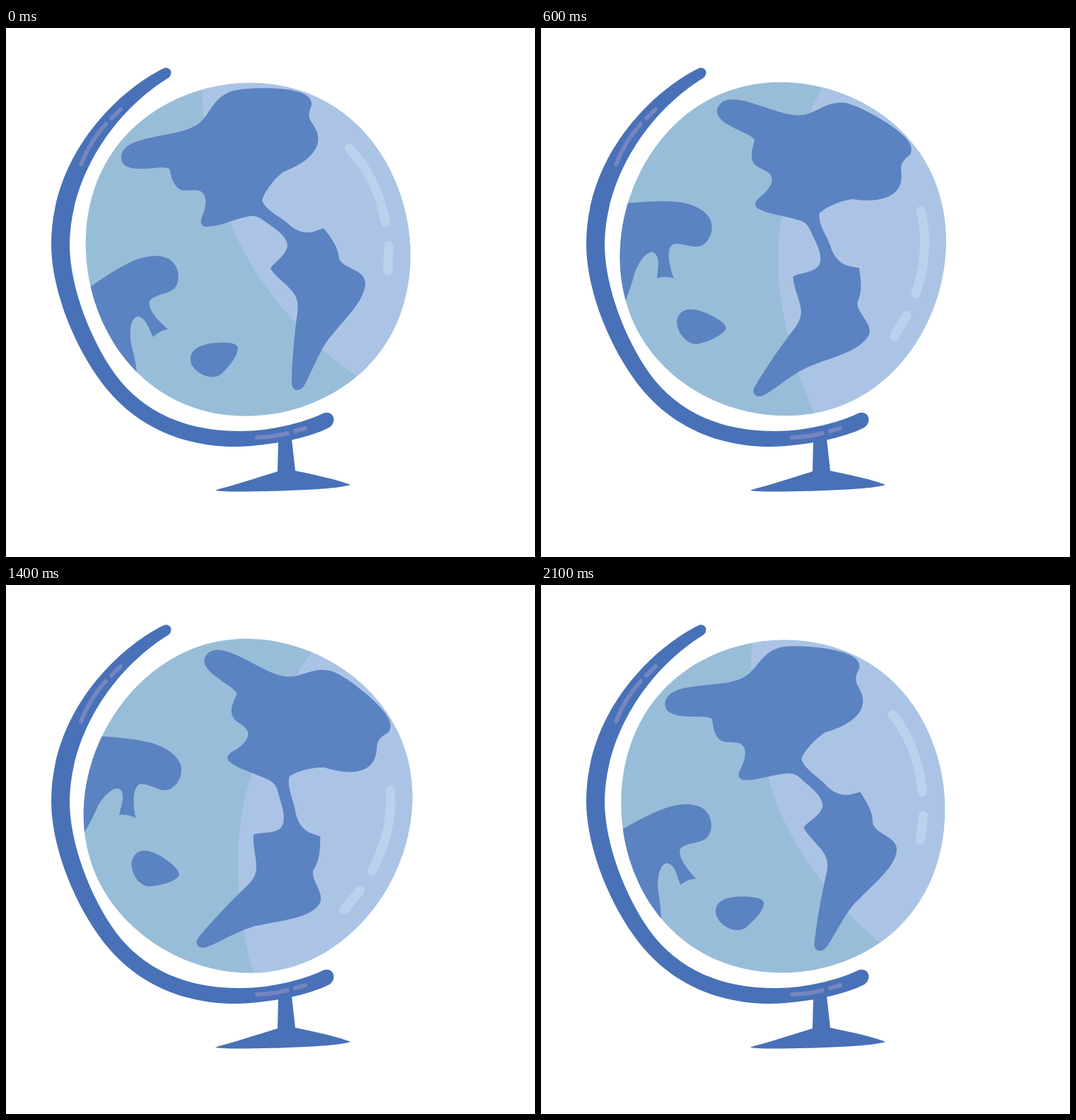
Animation of 748 by 748 pixels, one loop 2200 ms. Source, as an HTML page:

```html
<!DOCTYPE html>
<html lang="en">
<head>
<meta charset="utf-8">
<title>Swinging globe</title>
<style>
  html, body { margin: 0; width: 100%; height: 100%; overflow: hidden; background: #fff; }
  svg { display: block; width: 100vw; height: 100vh; }
  .land { fill: #5b83c1; }
  .stand { fill: #4871b8; }
  .line { fill: none; stroke-linecap: round; }
  .shine { stroke: #bcd1ee; stroke-width: 13; }
  .mark { stroke: #7585c0; stroke-width: 6; }
</style>
</head>
<body>
<svg viewBox="0 0 748 748">
  <defs><clipPath id="ball"><path id="rim"/></clipPath></defs>

  <g id="globe">
    <g clip-path="url(#ball)">
      <rect x="90" y="60" width="510" height="510" fill="#98bdd9"/>
      <path fill="#abc4e6" d="M277 60 L277 84 C281 170 294 222 317 272 C338 329 370 375 411 418
        C440 449 465 472 500 495 L620 560 L620 60 Z"/>
      <path class="land" d="M163 183 C163 168 180 160 205 155 C235 148 262 147 278 130
        C292 114 296 97 320 89 C345 83 393 84 413 90 C427 94 433 101 432 109
        C428 120 427 124 431 132 C438 142 443 150 441 162 C437 182 412 196 393 203
        C380 212 365 232 362 244 C368 258 385 265 398 276 C410 288 425 292 438 287
        C444 285 446 284 449 283 C456 292 470 308 471 326 C477 341 507 341 508 360
        C508 385 480 410 462 433 C445 450 432 488 422 505 C417 514 405 515 404 503
        C404 480 407 440 411 410 C414 393 413 383 406 374 C398 363 380 351 374 340
        C380 330 396 322 398 308 C397 295 384 286 371 277 C360 269 354 263 340 267
        C318 272 300 281 283 281 C275 280 274 274 278 265 C283 252 284 240 279 234
        C272 225 258 232 248 229 C236 224 234 210 231 199 C222 195 210 199 190 199
        C172 199 163 194 163 183 Z"/>
      <path class="land" d="M110 372 C125 362 150 344 172 333 C195 321 218 319 231 327
        C244 336 246 352 242 362 C236 378 212 374 203 386 C200 398 215 414 229 426
        C221 427 214 431 208 437 C202 425 198 409 186 408 C176 410 174 430 177 447
        C181 462 184 475 186 495 L110 495 Z"/>
      <path class="land" d="M261 466 C262 452 280 446 300 445 C316 444 328 446 328 453
        C327 466 312 482 305 489 C296 496 284 494 274 488 C265 482 260 475 261 466 Z"/>
      <path class="line shine" d="M485 170 Q525 212 536.5 275 M541 308 L540 343"/>
    </g>
  </g>

  <path class="stand" d="M222 57.5 C160 88 64 178 64 306 C64 365 92 440 130 494
    C170 552 235 592 325 592 C375 591 430 579 457 565 C465 560 465 550 460 546
    C456 543 451 543 446 546 C420 558 375 570 333 570 C248 571 189 538 153.5 488.5
    C119 440 90 365 90 306 C91 206 157 115 229 71 C234 68 235 61 231 58
    C228 55.5 225 56 222 57.5 Z"/>
  <path class="stand" d="M385 583 L404 581 L409 626 C438 632 474 640 487 646
    C470 652 400 655 330 655.5 C312 655.5 298 655 296 653.5 C320 647 355 636 384 627 Z"/>
  <path class="line mark" d="M106 193 Q118 161 141 136 M149 128 L162 115
    M355 579 Q380 578 398 573 M409 570 L423 566"/>
</svg>
<script>
  const CX = 343.5, CY = 312.6, STEP = 100;
  // Tilt in degrees for each step of the swing
  const tilts = [0, 5, 9.9, 14.9, 19.9, 24.8, 29.7, 34.2, 38.4, 42.1, 45,
                 46.2, 45, 42.2, 38.7, 34.6, 30.2, 25.6, 20.8, 15.9, 10.7, 5.2];

  // Slightly uneven round outline: envelope of tangents at distance h from the ball's middle
  function rimPath(cx, cy) {
    const points = [];
    for (let deg = 0; deg < 360; deg += 2) {
      const a = deg * Math.PI / 180, p = a + Math.PI / 15;
      const h = 233.8 - 3.25 * Math.cos(2 * p) - 1.9 * Math.cos(4 * p);
      const slope = 6.5 * Math.sin(2 * p) + 7.6 * Math.sin(4 * p);
      const x = cx + h * Math.cos(a) - slope * Math.sin(a);
      const y = cy + h * Math.sin(a) + slope * Math.cos(a);
      points.push(x.toFixed(2) + " " + y.toFixed(2));
    }
    return "M" + points.join("L") + "Z";
  }

  const globe = document.getElementById("globe");
  document.getElementById("rim").setAttribute("d", rimPath(CX - 1.3, CY + 0.6));

  const start = performance.now();
  function draw(now) {
    const step = Math.floor(Math.max(0, now - start) / STEP) % tilts.length;
    globe.setAttribute("transform", `rotate(${tilts[step]} ${CX} ${CY})`);
    requestAnimationFrame(draw);
  }
  draw(start);
</script>
</body>
</html>
```
